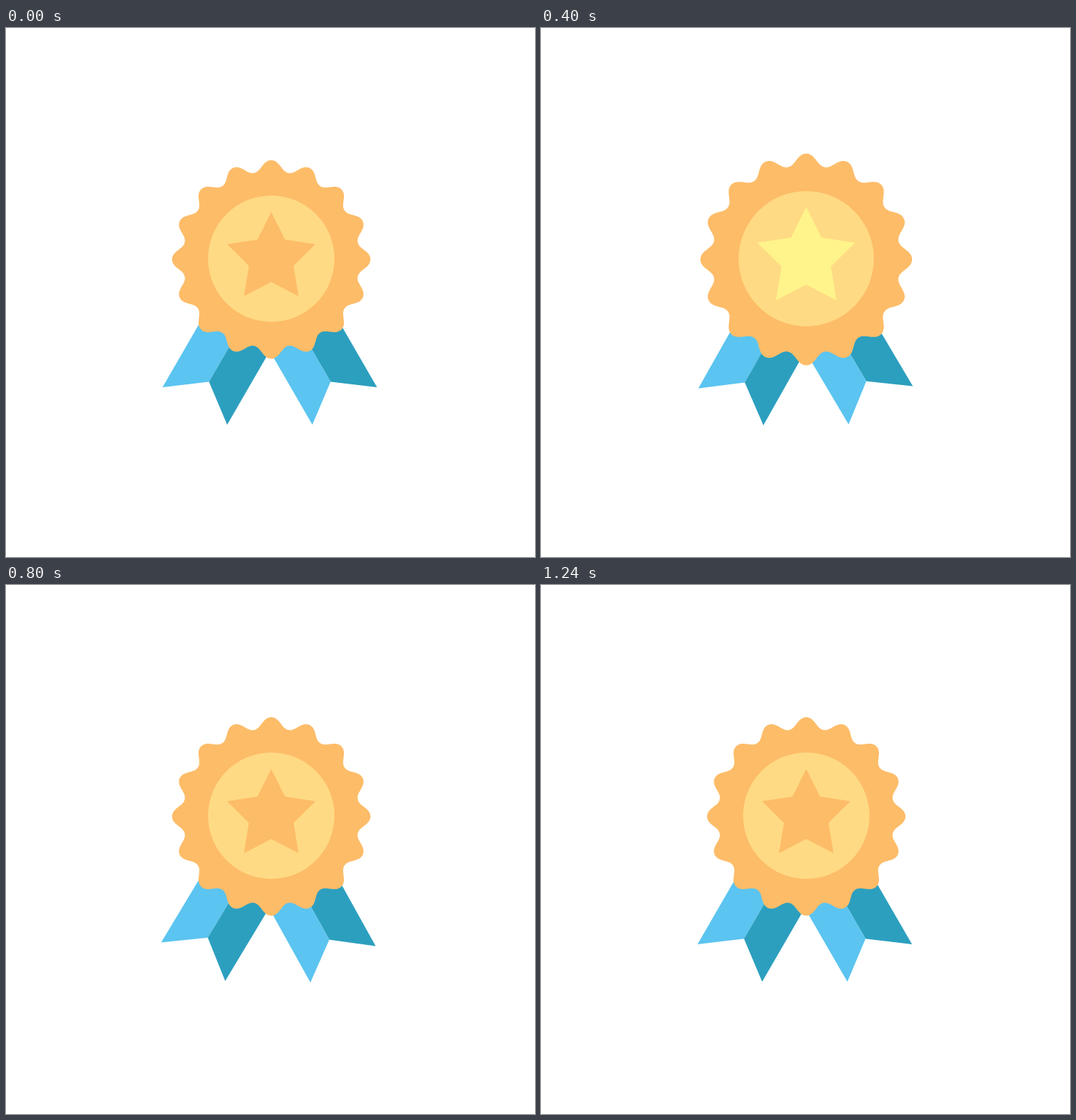
An HTML page with a canvas that plays this animation: 720x720 px, repeating every 1.28 s.

```html
<!DOCTYPE html>
<html lang="en">
<head>
<meta charset="utf-8">
<title>Award rosette</title>
<style>
  html, body { margin: 0; width: 100%; height: 100%; overflow: hidden; background: #fff; }
  canvas { display: block; width: 720px; height: 720px; }
</style>
</head>
<body>
<canvas id="stage" width="720" height="720"></canvas>
<script>
const ctx = document.getElementById('stage').getContext('2d');
const LOOP = 1280, STEP = 40, BEAT = 240, TAU = Math.PI * 2;
const CX = 361, CY = 315, PIVOT_Y = 383;
const ORANGE = [253, 188, 104], YELLOW = [255, 247, 141];
const GOLD = '#ffda84', LIGHT = '#5bc4f0', DARK = '#2c9fbf';

const lerp = (a, b, p) => a + (b - a) * p;
const rgb = color => `rgb(${color.map(Math.round).join(',')})`;

// Eased progress over one beat, from 0 at start to 1.
function ease(t, start) {
  const p = Math.min(1, Math.max(0, (t - start) / BEAT));
  return p * p * (3 - 2 * p);
}

// Swells to 1 from the time rise and sinks back to 0 from the time fall.
const pulse = (t, rise, fall = rise + 340) => ease(t, rise) - ease(t, fall);

// Swings from side to side once per beat, at rest at both ends of the loop.
function sway(t) {
  const start = 10, beat = Math.floor((t - start) / BEAT);
  const turn = n => n < 1 || n > 4 ? 0 : n % 2 ? 0.029 : -0.029;
  return lerp(turn(beat), turn(beat + 1), ease(t, start + beat * BEAT));
}

function polygon(points, color) {
  ctx.beginPath();
  points.forEach(([x, y]) => ctx.lineTo(x, y));
  ctx.closePath();
  ctx.fillStyle = color;
  ctx.fill();
}

function radial(cy, count, radius) {
  return Array.from({ length: count }, (_, i) => {
    const a = i / count * TAU, r = radius(a, i);
    return [CX + r * Math.sin(a), cy - r * Math.cos(a)];
  });
}

// Two strips with a notched end, running up behind the ring.
function ribbon(side, outerColor, innerColor) {
  const at = (x, y) => [359 + side * x, y];
  const raise = ([x, y]) => [x - side * 70, y - 121];
  const outer = at(146, 489), notch = at(82.7, 481.5), inner = at(58, 540);
  polygon([outer, notch, raise(notch), raise(outer)], outerColor);
  polygon([notch, inner, raise(inner), raise(notch)], innerColor);
}

function ribbons(angle) {
  ctx.save();
  ctx.translate(CX, PIVOT_Y);
  ctx.rotate(angle);
  ctx.translate(-CX, -PIVOT_Y);
  ribbon(-1, LIGHT, DARK);
  ribbon(1, DARK, LIGHT);
  ctx.restore();
}

function ring(scale) {
  // A little third harmonic rounds off the sixteen lobes.
  const wave = a => (Math.cos(16 * a) - 0.03 * Math.cos(48 * a)) / 0.97;
  polygon(radial(CY, 720, a => scale * (127.5 + 7.5 * wave(a))), rgb(ORANGE));
}

function disc(radius) {
  ctx.beginPath();
  ctx.arc(CX, 314, radius, 0, TAU);
  ctx.fillStyle = GOLD;
  ctx.fill();
}

function star(radius, glow) {
  const points = radial(313.8, 10, (a, i) => i % 2 ? radius * 0.505 : radius);
  polygon(points, rgb(ORANGE.map((v, i) => lerp(v, YELLOW[i], glow))));
}

function draw(t) {
  ctx.fillStyle = '#fff';
  ctx.fillRect(0, 0, 720, 720);
  ribbons(sway(t));
  ring(lerp(1, 1.067, pulse(t, 60)));
  disc(lerp(86, 92, pulse(t, 155)));
  star(lerp(63.2, 72, pulse(t, 235)), pulse(t, 190, 430));
}

function frame() {
  const t = performance.now() % LOOP;
  draw(Math.floor(t / STEP) * STEP);
  requestAnimationFrame(frame);
}
frame();
</script>
</body>
</html>
```
